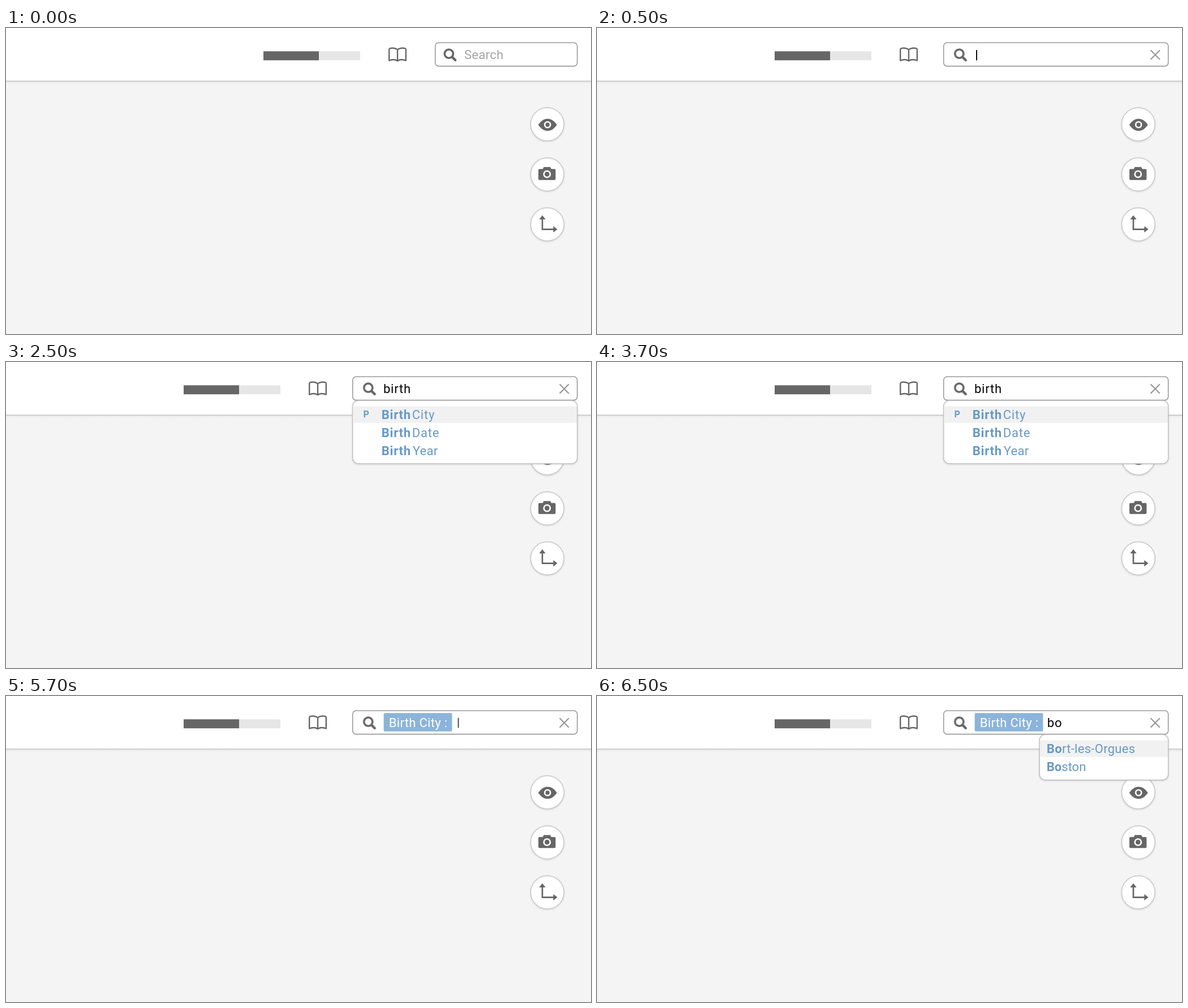
Recreate the animation shown at these times as an HTML page. Size 1034 by 542 pixels, loop 8000 ms.

```html
<!DOCTYPE html>
<html lang="en">
<head>
<meta charset="utf-8">
<title>Search field</title>
<style>
  html, body { margin: 0; width: 100%; height: 100%; overflow: hidden; background: #f4f4f4; }
  svg { display: block; width: 1034px; height: 542px; }
  text { font: 22px Roboto, Inter, sans-serif; letter-spacing: .3px; white-space: pre; }
  .wide { letter-spacing: .75px; }
  .link text { fill: #6699c8; }
  .bold { font-weight: 600; }
  .icon { fill: #666; }
  .line { fill: none; stroke: #666; }
  .field { fill: #fff; stroke: #999; stroke-width: 1.6; }
  .menu { fill: #fff; stroke: #c2c2c2; stroke-width: 1.5; filter: drop-shadow(0 1px 1.5px rgba(0,0,0,.14)); }
  .knob { fill: #fff; stroke: #c8c8c8; stroke-width: 1.5; filter: drop-shadow(0 1px 1.5px rgba(0,0,0,.12)); }

  .tools, .lens, .idle, .open, .empty, .fields, .token, .ready, .cities {
    animation: 8s step-end infinite;
  }
  .tools { animation-name: tools; }
  .lens { animation-name: lens; }
  .idle { animation-name: idle; }
  .open { animation-name: open; }
  .empty { animation-name: empty; }
  .fields { animation-name: fields; }
  .token { animation-name: token; }
  .ready { animation-name: ready; }
  .cities { animation-name: cities; }

  @keyframes tools { 0% { transform: none; } 6.25%, 100% { transform: translateX(-141px); } }
  @keyframes lens { 0% { transform: none; } 6.25%, 100% { transform: translateX(-142.5px); } }
  @keyframes idle { 0% { visibility: visible; } 6.25%, 100% { visibility: hidden; } }
  @keyframes open { 0% { visibility: hidden; } 6.25%, 100% { visibility: visible; } }
  @keyframes empty { 0%, 31.25%, 100% { visibility: hidden; } 6.25% { visibility: visible; } }
  @keyframes fields { 0%, 56.25%, 100% { visibility: hidden; } 31.25% { visibility: visible; } }
  @keyframes token { 0% { visibility: hidden; } 56.25%, 100% { visibility: visible; } }
  @keyframes ready { 0%, 81.25%, 100% { visibility: hidden; } 56.25% { visibility: visible; } }
  @keyframes cities { 0% { visibility: hidden; } 81.25%, 100% { visibility: visible; } }
</style>
</head>
<body>
<svg viewBox="0 0 1034 542">
  <defs>
    <linearGradient id="shade" x2="0" y2="1">
      <stop stop-color="#e4e4e4"/>
      <stop offset="1" stop-color="#f4f4f4"/>
    </linearGradient>
  </defs>

  <rect width="1034" height="542" fill="#f4f4f4"/>
  <rect y="94" width="1034" height="5" fill="url(#shade)"/>
  <rect width="1034" height="94" fill="#fff"/>
  <rect y="93.3" width="1034" height="1.6" fill="#c6c6c6"/>

  <!-- round buttons -->
  <circle class="knob" cx="956.8" cy="170.6" r="29.4"/>
  <path class="icon" d="M940.8 171.5C945.5 164.5 951 160.8 957.2 160.8S969 164.5 973.7 171.5C969 178.5 963.4 182.2 957.2 182.2S945.5 178.5 940.8 171.5Z"/>
  <circle cx="957.2" cy="171.3" r="5" fill="none" stroke="#fff" stroke-width="2.6"/>

  <circle class="knob" cx="956.8" cy="259.3" r="29.4"/>
  <path class="icon" d="M943 249.8H948.8L950.5 246.3H962L963.8 249.8H969.4Q971.4 249.8 971.4 251.8V267.2Q971.4 269.2 969.4 269.2H943Q941 269.2 941 267.2V251.8Q941 249.8 943 249.8Z"/>
  <circle cx="956.3" cy="258.9" r="5.6" fill="none" stroke="#fff" stroke-width="2.6"/>

  <circle class="knob" cx="956.8" cy="347.8" r="29.4"/>
  <path class="line" d="M948 337V356.6H969" stroke-width="2.7"/>
  <path class="icon" d="M948 331.8L953.6 339H942.4ZM974.6 356.6L967.3 362.3V350.9Z"/>

  <!-- progress and book -->
  <g class="tools">
    <rect x="455" y="41.3" width="171" height="15.9" fill="#e6e6e6"/>
    <rect x="455" y="41.3" width="98" height="15.9" fill="#666"/>
    <path class="line" d="M692 38.3C688.5 35.4 682.5 35 678.6 36.2Q677.2 36.7 677.2 38.2V57.6C682 55.6 688 55.6 692 58.2C696 55.6 702 55.6 706.8 57.6V38.2Q706.8 36.7 705.4 36.2C701.5 35 695.5 35.4 692 38.3V58" stroke-width="2.4" stroke-linejoin="round"/>
  </g>

  <!-- field -->
  <g class="idle">
    <rect class="field" x="758.7" y="26" width="251" height="41.6" rx="6"/>
    <text x="810" y="55.4" fill="#a3a3a3">Search</text>
  </g>
  <g class="open">
    <rect class="field" x="612.7" y="26" width="397" height="41.6" rx="6"/>
    <path d="M978.6 39.3L994.8 55.7M994.8 39.3L978.6 55.7" stroke="#999" stroke-width="2.2"/>
  </g>
  <g class="lens line">
    <circle cx="782.8" cy="45.6" r="7.6" stroke-width="3.6"/>
    <path d="M788.6 51.4L794.2 57" stroke-width="4.4" stroke-linecap="round"/>
  </g>

  <rect class="empty" x="670" y="39" width="1.9" height="18.3"/>

  <g class="fields">
    <text class="wide" x="667" y="55.3">birth</text>
    <rect class="menu" x="612.7" y="68.3" width="397" height="111.6" rx="10"/>
    <rect x="613.4" y="78.5" width="395.6" height="29.5" fill="#f1f1f1"/>
    <g class="link">
      <text class="bold" x="631.5" y="98.2" style="font-size:16px">P</text>
      <text class="bold wide" x="663.8" y="100.7">Birth</text>
      <text class="wide" x="717.8" y="100.7">City</text>
      <text class="bold wide" x="663.8" y="132.9">Birth</text>
      <text class="wide" x="717.8" y="132.9">Date</text>
      <text class="bold wide" x="663.8" y="165.1">Birth</text>
      <text x="718.8" y="165.1">Year</text>
    </g>
  </g>

  <g class="token">
    <rect x="667.6" y="30.3" width="120.8" height="32.5" rx="2" fill="#8cb4da"/>
    <text x="676.8" y="55.2" fill="#fff">Birth City :</text>
  </g>
  <rect class="ready" x="798.7" y="38.6" width="1.7" height="17.8" fill="#333"/>

  <g class="cities">
    <text class="wide" x="795.8" y="55.2">bo</text>
    <rect class="menu" x="782.2" y="68.3" width="227.5" height="80.4" rx="10"/>
    <rect x="782.9" y="78.5" width="226.1" height="29.5" fill="#f1f1f1"/>
    <g class="link">
      <text x="794.8" y="100.7"><tspan class="bold">Bo</tspan>rt-les-Orgues</text>
      <text x="794.8" y="132.9" style="letter-spacing:0"><tspan class="bold">Bo</tspan>ston</text>
    </g>
  </g>
</svg>
</body>
</html>
```
